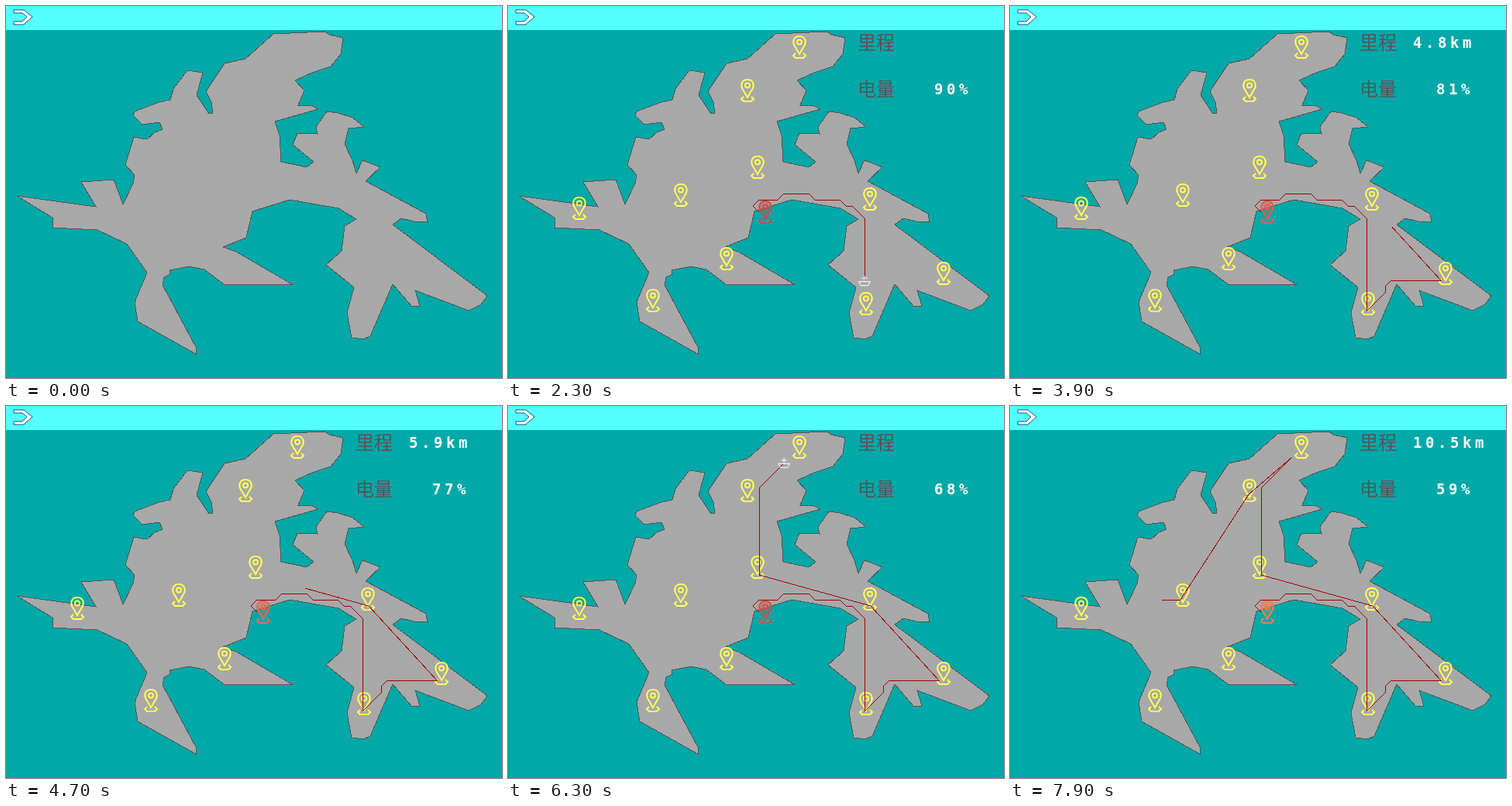
These frames come from a looping animation (640 by 480 pixels, 8 s). An HTML page without scripts:

```html
<!DOCTYPE html>
<html lang="zh">
<head>
<meta charset="utf-8">
<title>航线</title>
<style>
@property --d { syntax: "<number>"; inherits: true; initial-value: 0; }
@property --n { syntax: "<integer>"; inherits: true; initial-value: 0; }
@property --b { syntax: "<integer>"; inherits: true; initial-value: 100; }
@property --k { syntax: "<integer>"; inherits: true; initial-value: 0; }

html, body { margin: 0; width: 100%; height: 100%; overflow: hidden; background: #00a8a8; }
#stage { position: relative; width: 640px; height: 480px; overflow: hidden; animation: sail 8s linear infinite; }
svg { position: absolute; left: 0; top: 0; display: block; }

.land { fill: #a8a8a8; stroke: #555; shape-rendering: crispEdges; }
.late { animation: show 8s step-end infinite; }
.pins { color: #ffff55; }
.home { animation: tint 8s linear infinite; }
.label { font: 24px "Noto Sans CJK SC", "Noto Sans CJK", sans-serif; fill: #555; }

/* --d: distance sailed in px, --n: tenths of a km, --b: battery */
.track {
  fill: none; stroke: #a00000; shape-rendering: crispEdges;
  stroke-dasharray: calc(var(--d) * 1px) 2000px;
}
.boat {
  fill: none; stroke: #fff;
  offset-path: path("M324 266L316 258L324 250H348L356 242H388L396 250H428L436 258H444L460 274V394L484 370V362L492 354H556L468 258L324 218V106L364 66L308 114L220 250H180");
  offset-distance: calc(var(--d) * 1px);
  offset-rotate: 0deg;
  animation: blink 1s step-end infinite;
}

.num {
  position: absolute; white-space: pre; color: #fff;
  font: bold 19px/20px "DejaVu Sans Mono", monospace; letter-spacing: 4.56px;
}
.km { left: 520px; top: 37.4px; --k: calc((var(--n) - 4.5) / 10); animation: wipe 1s step-end infinite; }
.km::after {
  counter-reset: k var(--k) t calc(var(--n) - 10 * var(--k));
  content: counter(k) "." counter(t) "km";
}
.power { left: 550px; top: 97.4px; animation: redraw 1s step-end infinite; }
.power::after { counter-reset: p var(--b); content: counter(p) "%"; }

@keyframes sail {
  0%, 5.4% { --d: 0; --n: 0; --b: 100; }
  6.9% { --d: 22.6; }
  9.2% { --d: 46.6; }
  10% { --d: 57.9; }
  12.5% { --d: 83.9; --n: 7; --b: 98; }
  20.5% { --d: 175.2; }
  28.75% { --d: 256.2; --n: 25; --b: 90; }
  32.5% { --d: 295.2; }
  34.85% { --d: 329.1; }
  36.4% { --d: 348.5; }
  40% { --d: 385.5; --n: 38; --b: 85; }
  42.5% { --d: 412.5; }
  51.25% { --d: 542.7; }
  58.75% { --d: 627.8; --n: 59; --b: 77; }
  64.75% { --d: 692.1; }
  75.6% { --d: 804.1; }
  78.75% { --d: 849.4; --n: 81; --b: 68; }
  79.5% { --d: 860.7; }
  84.5% { --d: 934.5; }
  96.6% { --d: 1096.5; }
  98.75% { --d: 1120.5; --n: 105; --b: 59; }
  100% { --d: 1134; --n: 106; --b: 59; }
}
@keyframes show { 0% { visibility: hidden; opacity: 0; } 1.2%, 100% { visibility: visible; opacity: 1; } }
@keyframes tint {
  0%, 12.5% { color: #dc5550; }
  28.75% { color: #cc4c48; }
  58.75% { color: #ee6450; }
  78.75% { color: #d65048; }
  98.75%, 100% { color: #f07c50; }
}
@keyframes blink {
  0%, 39%, 59%, 89% { opacity: 0; }
  19%, 49%, 79% { opacity: 1; }
}
@keyframes wipe { 0%, 39% { opacity: 1; } 29% { opacity: 0; } }
@keyframes redraw { 0%, 29% { clip-path: none; } 19% { clip-path: inset(53% 0 0 0); } }
</style>
</head>
<body>
<div id="stage">
<svg width="640" height="480" viewBox="0 0 640 480">
  <defs>
    <g id="pin" stroke="currentColor" stroke-width="2" fill="none">
      <path d="M0 9L-7 -3C-9 -8 -7 -14 0 -14S9 -8 7 -3Z"/>
      <circle cy="-6.5" r="3"/>
      <path d="M-5 8L-8 11L-5 14H5L8 11L5 8"/>
    </g>
  </defs>

  <rect width="640" height="480" fill="#00a8a8"/>
  <rect width="640" height="31" fill="#55ffff"/>
  <path d="M10 5H23L34 14L23 24H10V20H21L27 14L21 9H10Z" fill="#f4ffff" stroke="#205080"/>

  <!-- west and east halves share an unstroked seam -->
  <path class="land" d="M366 250L318 265L310 299L280 311L297 317L369 359H281L256 340L236 336L211 341L212 346L204 350L202 360L245 440V449L170 407L166 382L182 344L156 307L118 289L60 286V273L14 245L116 259L97 227L139 224L151 256L164 229L166 218L154 205L165 169L182 172L192 163L202 159L198 150L176 153L164 141L166 136L198 124L212 121L216 107L234 83L254 86L246 115L262 139L267 138L265 124L258 110L282 74L309 68L345 36L412 33L417 37L435 41L432 62L419 78L395 86L373 96L385 109L377 128H393L403 133L347 149L353 167L355 201"/>
  <path class="land" d="M355 201L388 208L397 201L370 179L376 164L402 165L400 156L414 136L428 138L447 144L462 156L442 158L437 178L447 199L452 216L460 199L483 208L464 226L542 268L544 279L527 278L510 274L499 282L621 374L613 385L597 393L528 367L534 387L524 388L499 359L470 426L461 430L446 428L440 396L449 363L413 334L433 316L437 284L452 275L429 261L366 250"/>

  <g class="late">
    <g class="pins">
      <use href="#pin" x="376" y="53"/>
      <use href="#pin" x="309" y="109"/>
      <use href="#pin" x="322" y="208"/>
      <use href="#pin" x="223" y="244"/>
      <use href="#pin" x="92" y="261"/>
      <use href="#pin" x="467" y="249"/>
      <use href="#pin" x="282" y="326"/>
      <use href="#pin" x="562" y="345"/>
      <use href="#pin" x="187" y="380"/>
      <use href="#pin" x="462" y="384"/>
    </g>
    <g class="home">
      <path d="M332 275L325 263C323 258 325 252 332 252S341 258 339 263Z" fill="currentColor" fill-opacity=".35"/>
      <use href="#pin" x="332" y="266"/>
    </g>
    <text class="label" x="451" y="56">里程</text>
    <text class="label" x="451" y="116">电量</text>
    <path class="track" d="M324 266L316 258L324 250H348L356 242H388L396 250H428L436 258H444L460 274V394L484 370V362L492 354H556L468 258L324 218V106L364 66L308 114L220 250H180"/>
    <g class="boat"><path d="M0 -7V0M-4 -4H4M-8 .5H8M-7 .5L-5 5.5H5L7 .5"/></g>
  </g>
</svg>
<div class="late">
  <span class="num km"></span>
  <span class="num power"></span>
</div>
</div>
</body>
</html>
```
